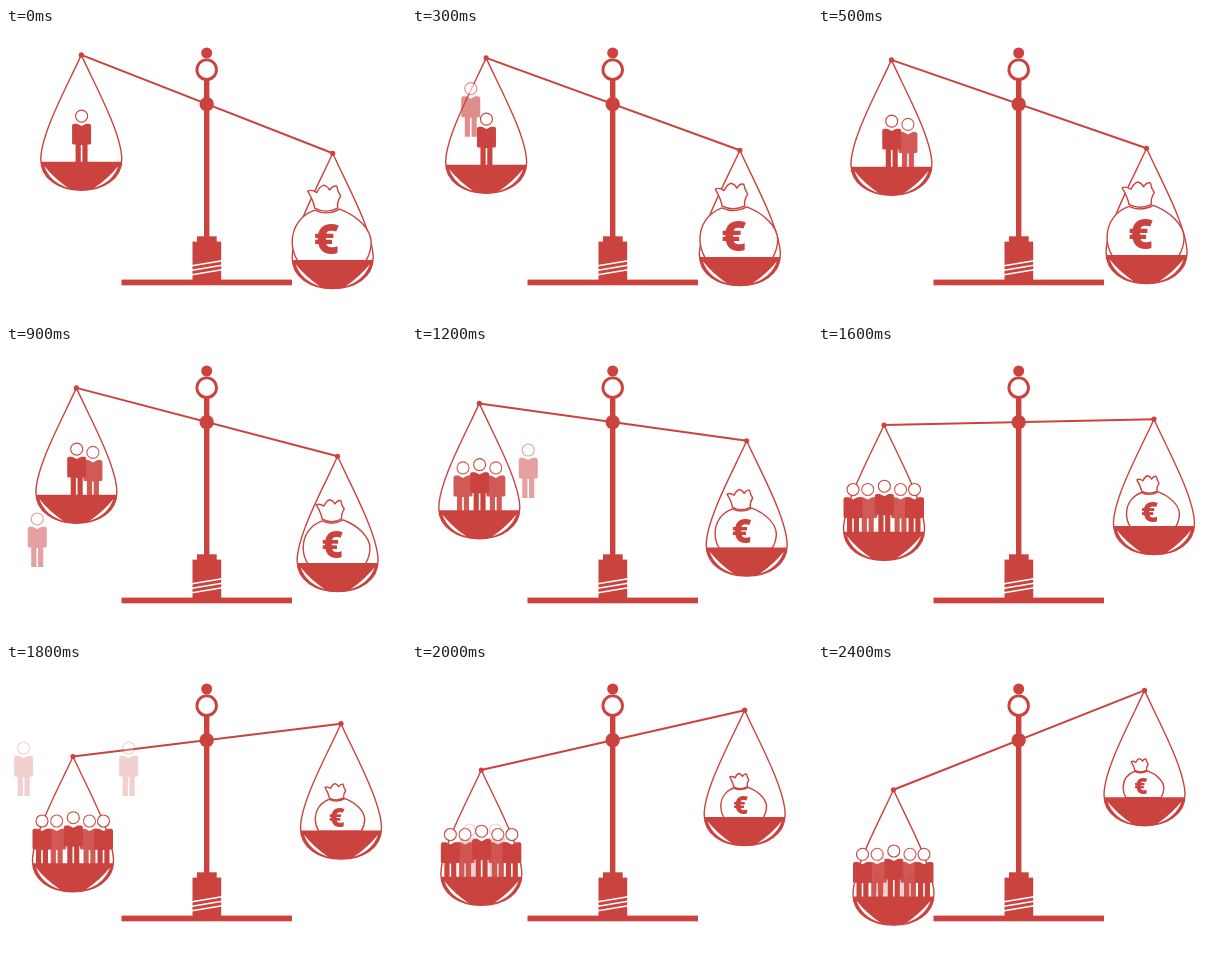
Write an HTML page with a canvas that moves like this. It is 400x290 px and loops after 4.4 s.

```html
<!DOCTYPE html>
<html lang="en">
<head>
<meta charset="utf-8">
<title>Balance of people and money</title>
<style>
  html, body { margin: 0; width: 100%; height: 100%; overflow: hidden; background: #fff; }
  canvas { display: block; }
</style>
</head>
<body>
<canvas id="stage" width="400" height="290"></canvas>
<script>
const ctx = document.getElementById('stage').getContext('2d');
const RED = '#cb433f';
const STEP = 100, LAST_STEP = 24, LOOP = 4400;
const CENTER = { x: 201, y: 76.1 }, ARM = 135, RIM = 106.8;

// [step, value] keys
const TILT = [[0, -49.2], [5, -44.2], [6, -40.2], [9, -34.2], [12, -18.7], [16, 2.9], [20, 29.9], [24, 49.7]];
const BAG_SCALE = [[0, 1], [5, .975], [9, .845], [12, .775], [16, .67], [20, .58], [24, .515]];

// Back to front: flight start and end steps, start point, seat under the beam end, final opacity
const PEOPLE = [
  { from: 16, to: 20, x: -22, y: 2, seat: [-12, 60], alpha: .25, sink: [2, 15] },
  { from: 16, to: 20, x: 162, y: 2, seat: [14, 60], alpha: .25, sink: [-2, 15] },
  { from: 0, to: 5, x: 12, y: 7, seat: [16.5, 64.5], alpha: .88 },
  { from: 6, to: 12, x: 11.5, y: 224, seat: [-16.3, 64.5], alpha: .88 },
  { from: 9, to: 15, x: 136, y: 70, seat: [30.5, 64.5], alpha: 1 },
  { from: 12, to: 16, x: 1, y: 228, seat: [-31, 64.5], alpha: 1 },
  { from: -1, to: 0, x: 0, y: 0, seat: [.3, 61.2], alpha: 1 }
];

const lerp = (a, b, p) => a + (b - a) * p;
const clamp = p => Math.max(0, Math.min(1, p));

function valueAt(keys, step) {
  const i = Math.max(1, keys.findIndex(key => key[0] >= step));
  const [s0, v0] = keys[i - 1], [s1, v1] = keys[i];
  return lerp(v0, v1, (step - s0) / (s1 - s0));
}

function beamEnd(step, side) {
  const dy = valueAt(TILT, step);
  return { x: CENTER.x + side * Math.sqrt(ARM * ARM - dy * dy), y: CENTER.y - side * dy };
}

const ROPES = new Path2D('M0 0C-12 27-40 77-40.5 104C-40.5 124-22 135.3 0 135.3' +
  'C22 135.3 40.5 124 40.5 104C40 77 12 27 0 0');
const BOWL = new Path2D(`M-40.5 ${RIM}C-39 125-21 135.5 0 135.5C21 135.5 39 125 40.5 ${RIM}Z`);
const SHINE = new Path2D('M-37 111Q-31.5 127-13 133Q-27.5 123-37 111ZM37 111Q31.5 127 13 133Q27.5 123 37 111Z');
const BODY = new Path2D('M-9.5 9L-8 7.7H-4.5L0 10L4.5 7.7H8L9.5 9V27.5L8.5 28.5H6V48H.8V29H-.8V48H-6V28.5H-8.5L-9.5 27.5Z');
const SACK = new Path2D('M-17-50C-31-45-39.5-33-39.5-18Q-39.5-8-34 1H34Q39.5-8 39.5-18C39-31 26-44 8-51Q-5-44-17-50Z');
const SACK_TOP = new Path2D('M-17-52C-18-58-21-64-24-69Q-20-71-15-67.5Q-12-74-8-75' +
  'Q-4-74-2-70Q1-75 5-74Q6-68 9-64Q5-58 6-52Q-6-46-17-52Z');

function stroke(path, width) {
  ctx.lineWidth = width;
  ctx.stroke(path);
}

function circle(x, y, r, lineWidth) {
  ctx.beginPath();
  ctx.arc(x, y, r, 0, Math.PI * 2);
  ctx.fillStyle = lineWidth ? '#fff' : RED;
  ctx.fill();
  if (lineWidth) {
    ctx.lineWidth = lineWidth;
    ctx.stroke();
  }
  ctx.fillStyle = RED;
}

function line(x1, y1, x2, y2, width) {
  ctx.beginPath();
  ctx.moveTo(x1, y1);
  ctx.lineTo(x2, y2);
  ctx.lineWidth = width;
  ctx.stroke();
}

function placed(x, y, draw) {
  ctx.save();
  ctx.translate(x, y);
  draw();
  ctx.restore();
}

function drawStand() {
  ctx.fillRect(198, 50, 5.4, 160);
  circle(200.7, 25, 5.5);
  circle(200.7, 41.7, 9.8, 2.9);
  ctx.fillRect(191, 208.3, 19.7, 6);
  ctx.fillRect(186.5, 213.6, 28.7, 39);
  ctx.fillRect(115.5, 251.6, 170.5, 5.7);
  ctx.strokeStyle = '#fff';
  for (let y = 237.8; y < 248; y += 4.5) line(186, y, 216, y - 5, 1.5);
  ctx.strokeStyle = RED;
}

function drawPerson({ from, to, x, y, seat, alpha, sink = [0, 0] }, step) {
  const p = clamp((step - from) / (to - from));
  if (!p) return;
  // Fly straight to where the seat will be on landing, then ride along with it
  const end = beamEnd(Math.max(step, to), -1);
  const sunk = clamp((step - to) / (LAST_STEP - to));
  const seatX = end.x + seat[0] + sink[0] * sunk;
  const seatY = end.y + seat[1] + sink[1] * sunk;
  placed(lerp(x, seatX, p), lerp(y, seatY, p), () => {
    ctx.globalAlpha = Math.min(alpha, p);
    circle(0, 0, 6, 1.1);
    ctx.fill(BODY);
  });
}

function drawBag(end, scale) {
  placed(end.x - 1, end.y + RIM, () => {
    ctx.scale(scale, scale);
    for (const part of [SACK, SACK_TOP]) {
      ctx.fillStyle = '#fff';
      ctx.fill(part);
      stroke(part, 1.4 / scale);
    }
    ctx.fillStyle = RED;
    ctx.font = '800 43px "Open Sans", sans-serif';
    ctx.textAlign = 'center';
    ctx.fillText('€', -5, -6);
  });
}

function drawPan(end, drawLoad) {
  placed(end.x, end.y, () => stroke(ROPES, 1.4));
  drawLoad();
  placed(end.x, end.y, () => {
    ctx.fill(BOWL);
    ctx.fillStyle = '#fff';
    ctx.fill(SHINE);
  });
  circle(end.x, end.y, 2.6);
}

function draw(step) {
  ctx.fillStyle = '#fff';
  ctx.fillRect(0, 0, 400, 290);
  ctx.fillStyle = ctx.strokeStyle = RED;
  ctx.lineJoin = 'round';

  const left = beamEnd(step, -1), right = beamEnd(step, 1);
  drawStand();
  line(left.x, left.y, right.x, right.y, 2);
  circle(200.7, 76.1, 7.2);
  drawPan(left, () => PEOPLE.forEach(person => drawPerson(person, step)));
  drawPan(right, () => drawBag(right, valueAt(BAG_SCALE, step)));
}

function tick() {
  draw(Math.min(LAST_STEP, Math.floor(performance.now() % LOOP / STEP)));
  requestAnimationFrame(tick);
}
tick();
</script>
</body>
</html>
```
